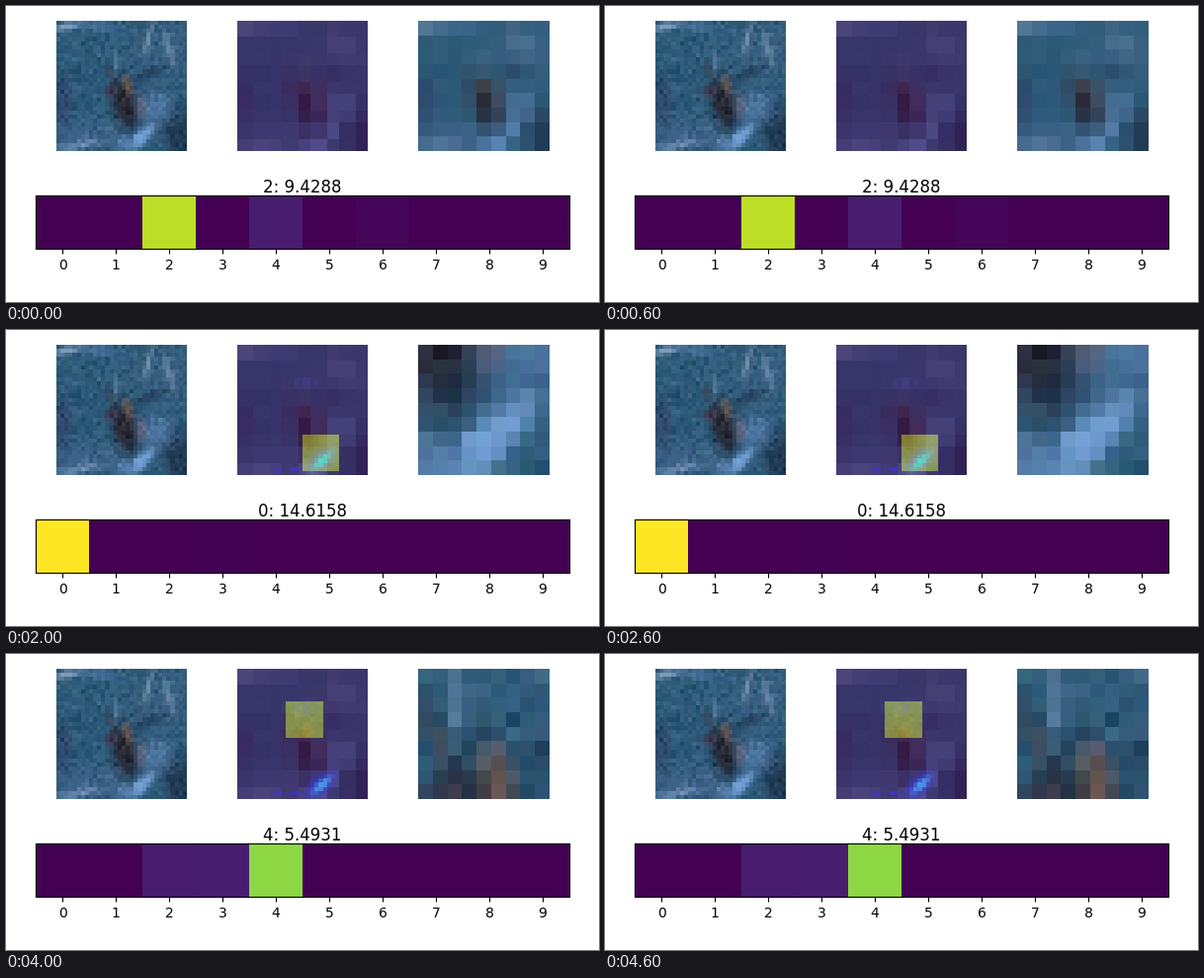
A matplotlib script that plays this animation: 600x300 px, repeating every 5 s.

```python
import numpy as np
import matplotlib.pyplot as plt
from matplotlib.animation import FuncAnimation
from matplotlib.colors import to_rgb

W, H, DPI = 600, 300, 100
N, G = 32, 9                      # photo size, glimpse size
MIX = 0.42                        # weight of the attention overlay
VIRIDIS = plt.get_cmap("viridis")
yy, xx = np.mgrid[:N, :N].astype(float)


def blob(x, y, rx, ry, turn=0, power=1.5):
    """Soft rotated ellipse with values 0..1 on the photo grid."""
    a = np.radians(turn)
    dx, dy = xx - x, yy - y
    u = (dx * np.cos(a) + dy * np.sin(a)) / rx
    v = (dy * np.cos(a) - dx * np.sin(a)) / ry
    return np.exp(-(u * u + v * v) ** power)


def paint(img, mask, color, strength=1.0):
    k = (mask * strength)[..., None]
    return img * (1 - k) + np.array(to_rgb(color)) * k


def make_photo():
    rng = np.random.default_rng(4)
    img = np.ones((N, N, 3)) * to_rgb("#2d5a78")
    shapes = [
        # x, y, rx, ry, turn, colour, strength
        (26, 7, 9, 8, 0, "#3a5f80", .8),
        (7, 28, 10, 4, 0, "#43658c", .8),
        (24, 21, 5, 4, 0, "#557ba6", .8),
        (30, 28, 4, 7, 0, "#20354f", .8),
        (1, 19, 2.5, 6, 0, "#34486c", .8),
        (2, 1, 4, 1, -10, "#8aa8c4", .8),
        (10, 1, 6, 1.2, 10, "#4f78a8", .7),
        (5, 30, 5, 1, -12, "#7f9fc4", .7),
        (22, 4, .8, 4, 15, "#8aa6c0", .6),
        (27, 6, .8, 5, -15, "#7d9ab8", .6),
        (14, 9, .9, 3, -10, "#6d8fb0", .6),
        (22, 12.5, 5, 1.2, -20, "#28415f", .8),
        (13, 13, .8, 4, -20, "#3f4452", .6),
        (16.3, 20, 3, 6.2, -12, "#24232d", .97),
        (13, 17, 1.6, 1.6, 0, "#40344a", .9),
        (17, 15.5, 1.1, 3, -8, "#705650", .85),
        (20.3, 20.5, 1.2, 3, 0, "#676377", .7),
        (20.5, 28, 4, 1.6, -42, "#76a4dc", .95),
        (16, 29.5, 2, 1.6, 0, "#6a90bd", .7),
    ]
    for x, y, rx, ry, turn, color, strength in shapes:
        img = paint(img, blob(x, y, rx, ry, turn), color, strength)
    img += rng.normal(0, .028, (N, N, 1)) + rng.normal(0, .008, (N, N, 3))
    return img.clip(0, 1)


def shrink(img):
    """Average the photo down to the glimpse size."""
    edges = np.arange(G + 1) * N / G
    i = np.arange(N)
    w = np.clip(np.minimum(edges[1:, None], i + 1)
                - np.maximum(edges[:-1, None], i), 0, 1) * G / N
    return np.einsum("ai,bj,ijc->abc", w, w, img)


def crop(box):
    x, y = box
    return photo[y:y + G, x:x + G]


photo = make_photo()
coarse = shrink(photo)
cell = np.arange(N) * G // N
canvas = coarse[cell][:, cell]

# glimpse corner, title, class probabilities
steps = [
    (None, "2: 9.4288", {2: .9, 4: .08, 6: .012}),
    ((8, 22), "2: 9.6196", {0: .085, 2: .895, 4: .014}),
    ((16, 22), "0: 14.6158", {0: 1, 3: .004}),
    ((12, 14), "2: 13.8190", {2: 1}),
    ((12, 8), "4: 5.4931", {2: .08, 3: .085, 4: .83}),
]


def attention(k):
    """Coarse view, revealed details and the current glimpse box."""
    box = steps[k][0]
    heat = np.zeros((N, N))
    base = canvas.copy()
    if box:
        x, y = box
        base[y:y + G, x:x + G] = .5 * (base[y:y + G, x:x + G] + crop(box))
        heat[y:y + G, x:x + G] = 1
    view = base * (1 - MIX) + VIRIDIS(heat)[..., :3] * MIX
    if k == 1:
        view = paint(view, blob(15.5, 28.5, 1, 1.8, 30), "#8c8cc4", .8)
    if k >= 2:
        halo = "#7f86b4" if k == 2 else "#3c34d8"
        core = "#5cdcc0" if k == 2 else "#4a9ce6"
        view = paint(view, blob(20, 28, 4.2, 2, -38), halo, .8)
        view = paint(view, blob(20.3, 28, 2.9, .95, -42), core, .95)
        for x, r in ((9.5, 1), (13.5, 1.3)):
            view = paint(view, blob(x, 30, r, .7), "#3f35c8", .8)
        streaks = blob(16, 9, 4, 1.5) * (np.sin(xx * 2.4) > 0)
        view = paint(view, streaks, "#7d86a0" if k == 4 else "#45429a", .5)
    return view.clip(0, 1)


def chances(k):
    row = np.zeros((1, 10))
    for i, p in steps[k][2].items():
        row[0, i] = p
    return row


def axes_px(x, y, w, h):
    return fig.add_axes([x / W, 1 - (y + h) / H, w / W, h / H])


def panel(x, img):
    ax = axes_px(x, 15, 132, 132)
    ax.axis("off")
    return ax.imshow(img, interpolation="nearest", aspect="auto")


fig = plt.figure(figsize=(W / DPI, H / DPI), dpi=DPI, facecolor="white")
plt.rcParams["font.family"] = "DejaVu Sans"

panel(51, photo)
mid = panel(234, attention(0))
glimpse = panel(417, coarse)

bar_ax = axes_px(30, 192, 540, 54)
bar = bar_ax.imshow(chances(0), cmap="viridis", vmin=0, vmax=1,
                    interpolation="nearest", aspect="auto")
bar_ax.set_xticks(range(10))
bar_ax.set_yticks([])
title = fig.text(.5, 1 - 189 / H, steps[0][1], fontsize=12,
                 ha="center", va="baseline")


def update(k):
    box, label, _ = steps[k]
    mid.set_data(attention(k))
    glimpse.set_data(crop(box) if box else coarse)
    bar.set_data(chances(k))
    title.set_text(label)
    return mid, glimpse, bar, title


anim = FuncAnimation(fig, update, frames=len(steps), interval=1000,
                     repeat=True, repeat_delay=0, blit=False)
plt.show()
```
